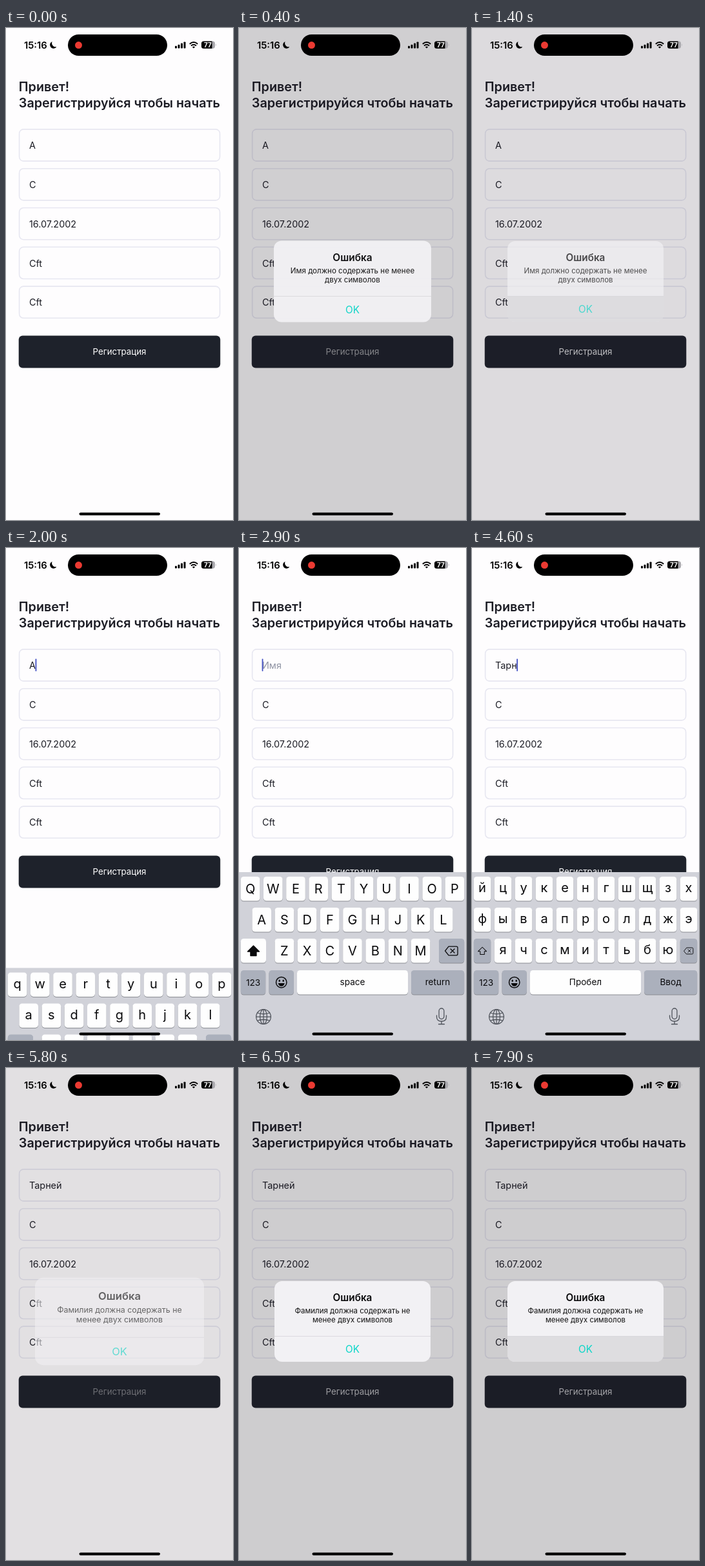
An HTML page that plays this animation: 352x762 px, repeating every 8000 ms.

```html
<!DOCTYPE html>
<html lang="ru">
<head>
<meta charset="utf-8">
<title>Регистрация</title>
<style>
html, body { margin: 0; width: 100%; height: 100%; overflow: hidden; background: #fefdfe; }
svg { display: block; width: 100%; height: 100%; }
text { font-family: Inter, Roboto, sans-serif; fill: #1c1d25; white-space: pre; }
.mid { text-anchor: middle; }
.head { font-size: 19.8px; font-weight: 600; }
.field { font-size: 14.4px; }
.note { font-size: 11.5px; fill: #111; }
.key { font-size: 20px; fill: #0a0a0c; }
.word { font-size: 13.6px; fill: #0a0a0c; }
</style>
</head>
<body>
<svg id="stage" viewBox="0 0 352 762"></svg>
<script>
const LOOP = 8000, STEP = 100;
const NAME = 'Тарней';
const PAPER = '#fefdfe', INK = '#0a0a0c', KEY = '#fefefe', GRAY = '#abb0bc';
const ROW_TOP = [509, 557, 605, 654], KEY_H = 37.5;
const stage = document.getElementById('stage');

function add(parent, tag, attrs = {}, content) {
  const el = document.createElementNS('http://www.w3.org/2000/svg', tag);
  for (const k in attrs) el.setAttribute(k, attrs[k]);
  if (content !== undefined) el.textContent = content;
  parent.appendChild(el);
  return el;
}
const box = (p, x, y, width, height, rx, fill, more) =>
  add(p, 'rect', { x, y, width, height, rx, fill, ...more });
const label = (p, cls, x, y, str, more) => add(p, 'text', { class: cls, x, y, ...more }, str);
const line = (p, d, stroke, width, more) =>
  add(p, 'path', { d, stroke, 'stroke-width': width, fill: 'none', 'stroke-linecap': 'round', 'stroke-linejoin': 'round', ...more });
const show = (el, on) => el.setAttribute('display', on ? 'inline' : 'none');
const put = (el, str) => { if (el.textContent !== str) el.textContent = str; };

// Form
const form = add(stage, 'g');
box(form, 0, 0, 352, 762, 0, PAPER);
label(form, 'head', 19.8, 98, 'Привет!');
label(form, 'head', 19.8, 123, 'Зарегистрируйся чтобы начать');
const fields = ['A', 'C', '16.07.2002', 'Cft', 'Cft'].map((value, i) => {
  const y = 156.9 + i * 60.8;
  box(form, 20.6, y, 311, 49.2, 6.5, PAPER, { stroke: '#e7e7f1', 'stroke-width': 1.6 });
  return label(form, 'field', 36, y + 30.2, value);
});
const caret = box(form, 36, 171.5, 1.8, 19.5, 0.9, '#4350c4');
box(form, 19.7, 476.5, 312.6, 50.1, 6, '#1e222b');
const submit = label(form, 'mid', 176, 506.4, 'Регистрация', { 'font-size': 13.3, style: 'fill:#fff' });

// Keyboard
const board = add(stage, 'g');
box(board, 0, 502, 352, 262, 0, '#d1d2d9');

function keyCap(p, x, y, w, fill) {
  box(p, x, y + 1, w, KEY_H, 4.6, '#8b8d93');
  return box(p, x, y, w, KEY_H, 4.6, fill);
}

function makeLayout(rows, centers, pitch, keyW, sideW, iconScale, words) {
  const g = add(board, 'g'), keys = {};
  rows.forEach((row, r) => [...row].forEach((ch, i) => {
    const x = centers[r] + i * pitch, y = ROW_TOP[r];
    keyCap(g, x - keyW / 2, y, keyW, KEY);
    keys[ch] = { x, y, w: keyW, text: label(g, 'key mid', x, y + 25, ch) };
  }));
  const shiftCap = keyCap(g, 2.8, ROW_TOP[2], sideW, GRAY);
  const eraseCap = keyCap(g, 349.2 - sideW, ROW_TOP[2], sideW, GRAY);
  const at = x => ({ transform: `translate(${x} 624) scale(${iconScale})` });
  const shift = line(g, 'M0-8 9 1H4.5V7.5H-4.5V1H-9Z', INK, 1.4, at(2.8 + sideW / 2));
  line(g, 'M-10 0-4.5-6.8H7.5Q9.5-6.8 9.5-4.8V4.8Q9.5 6.8 7.5 6.8H-4.5ZM-1.5-3 4.5 3M4.5-3-1.5 3', INK, 1.3,
    at(349.2 - sideW / 2));
  const space = label(g, 'word mid', 176, 676.5, words[0]);
  label(g, 'word mid', 308, 677.3, words[1]);
  const setCase = upper => {
    for (const ch in keys) {
      put(keys[ch].text, upper ? ch.toUpperCase() : ch);
      keys[ch].text.setAttribute('y', keys[ch].y + (upper ? 26 : 24.3));
    }
    shiftCap.setAttribute('fill', upper ? KEY : GRAY);
    shift.setAttribute('fill', upper ? INK : 'none');
  };
  return { g, keys, eraseCap, space, setCase };
}

keyCap(board, 2.8, ROW_TOP[3], 38.4, GRAY);
keyCap(board, 46.5, ROW_TOP[3], 38.4, GRAY);
keyCap(board, 90, ROW_TOP[3], 172, KEY);
keyCap(board, 267, ROW_TOP[3], 82.2, GRAY);
label(board, 'word mid', 22, 677.5, '123');
const face = add(board, 'g', { transform: 'translate(65.7 672.7)' });
add(face, 'circle', { r: 8.2, fill: 'none', stroke: INK, 'stroke-width': 1.5 });
for (const x of [-3, 3]) add(face, 'ellipse', { cx: x, cy: -2.5, rx: 1.2, ry: 1.7, fill: INK });
add(face, 'path', { d: 'M-5 1.3H5Q4 6 0 6T-5 1.3Z', fill: INK });

const en = makeLayout(['qwertyuiop', 'asdfghjkl', 'zxcvbnm'], [17.6, 35.2, 70.4], 35.2, 29.6, 39.2, 1,
  ['space', 'return']);
const ru = makeLayout(['йцукенгшщзх', 'фывапролджэ', 'ячсмитьбю'], [16, 16, 48], 32, 26.6, 26.4, 0.72,
  ['Пробел', 'Ввод']);

const globe = add(board, 'g', { transform: 'translate(38 726)', fill: 'none', stroke: '#50545c', 'stroke-width': 1.25 });
add(globe, 'circle', { r: 11.4 });
add(globe, 'ellipse', { rx: 5.4, ry: 11.4 });
add(globe, 'path', { d: 'M0-11.4V11.4M-11.4 0H11.4M-9.5-6Q0-2.5 9.5-6M-9.5 6Q0 2.5 9.5 6' });
const mic = add(board, 'g', { transform: 'translate(314 725)' });
box(mic, -3.9, -12, 7.8, 16.5, 3.9, 'none', { stroke: '#50545c', 'stroke-width': 1.3 });
line(mic, 'M-7.5-1V1.2Q-7.5 8 0 8T7.5 1.2V-1M0 8V12.5M-4.5 12.5H4.5', '#50545c', 1.3);

// Bubble above a pressed key
const bubble = add(board, 'g');
const bubbleShape = add(bubble, 'path', { fill: KEY, stroke: '#b6b8c0', 'stroke-width': 0.6 });
const bubbleText = label(bubble, 'mid', 0, 0, '', { 'font-size': 31 });
function popUp(key, ch) {
  show(bubble, !!key);
  if (!key) return;
  const h = key.w / 2, left = Math.max(1, key.x - h - 9), right = key.x + h + 9;
  const top = key.y - 52, a = key.x - h, b = key.x + h;
  bubbleShape.setAttribute('d', `M${left + 8} ${top}H${right - 8}Q${right} ${top} ${right} ${top + 8}V${key.y - 14}` +
    `C${right} ${key.y - 4} ${b} ${key.y - 5} ${b} ${key.y + 5}V${key.y + 33}Q${b} ${key.y + 38} ${b - 5} ${key.y + 38}` +
    `H${a + 5}Q${a} ${key.y + 38} ${a} ${key.y + 33}V${key.y + 5}C${a} ${key.y - 5} ${left} ${key.y - 4} ${left} ${key.y - 14}` +
    `V${top + 8}Q${left} ${top} ${left + 8} ${top}Z`);
  bubbleText.setAttribute('x', (left + right) / 2);
  bubbleText.setAttribute('y', key.y - 16);
  put(bubbleText, ch);
}

// Alert
const dim = box(stage, 0, 0, 352, 762, 0, '#110b18');
const alertBox = add(stage, 'g');
box(alertBox, 55, 330, 242, 125, 12, '#f2f1f4');
const okPress = add(alertBox, 'path', { d: 'M55 415.5H297V443Q297 455 285 455H67Q55 455 55 443Z', fill: '#dedde0' });
box(alertBox, 55, 415, 242, 0.7, 0, '#d3d2d7');
label(alertBox, 'mid', 176, 361.4, 'Ошибка', { 'font-size': 15.3, 'font-weight': 600, style: 'fill:#08080a' });
const notes = [379.9, 394.2].map(y => label(alertBox, 'note mid', 176, y, ''));
label(alertBox, 'mid', 176, 441.4, 'OK', { 'font-size': 15.2, style: 'fill:#08d6c8' });

// Status bar
const bar = add(stage, 'g');
label(bar, '', 28, 31.6, '15:16', { 'font-size': 14.8, 'font-weight': 600, style: 'fill:#000' });
add(bar, 'path', { d: 'M71.6 21A5.6 5.6 0 1 0 78.4 29.2A6 6 0 0 1 71.6 21Z' });
box(bar, 96, 10, 154, 33, 16.5, '#000');
add(bar, 'circle', { cx: 112.5, cy: 26.6, r: 5.5, fill: '#eb3a32' });
[3.6, 5.6, 7.8, 10].forEach((h, i) => box(bar, 262 + i * 4.5, 31.4 - h, 3, h, 0.9, '#000'));
line(bar, 'M284.8 24.8Q291 19.2 297.2 24.8M287 27.4Q291 24 295 27.4', '#000', 2, { 'stroke-linecap': 'butt' });
add(bar, 'path', { d: 'M288.8 29.2Q291 27.6 293.2 29.2L291 31.6Z' });
box(bar, 303, 20.4, 21, 11.4, 3.6, '#a9a8ad');
add(bar, 'path', { d: 'M306.6 20.4H319.5V31.8H306.6Q303 31.8 303 28.2V24Q303 20.4 306.6 20.4Z' });
add(bar, 'path', { d: 'M325 24.2Q326.6 26.1 325 28Z', fill: '#a9a8ad' });
label(bar, 'mid', 313, 29.8, '77', { 'font-size': 10, 'font-weight': 700, style: 'fill:#fff' });
box(bar, 113.5, 750.4, 125.5, 4.4, 2.2, '#000');

// Timeline
const alerts = [
  { start: 130, press: 1300, close: 1360, end: 1900, notes: ['Имя должно содержать не менее', 'двух символов'] },
  { start: 5725, press: 7900, close: LOOP, end: LOOP, notes: ['Фамилия должна содержать не', 'менее двух символов'] }
];
// [key down, letter typed, key up]
const strokes = [[3600, 3700, 3800], [4000, 4100, 4100], [4200, 4300, 4300],
  [4400, 4500, 4600], [4700, 4800, 4800], [4900, 5000, 5100]];
const within = (t, a, b) => t >= a && t < b;

function drawAlert(t) {
  const a = alerts.find(v => within(t, v.start, v.end));
  show(alertBox, a);
  show(dim, a);
  let textAlpha = within(t, 100, 130) || within(t, 5600, 5725) ? 0.3 : 1;
  if (a) {
    const age = t - a.start, rest = Math.exp(-age / 85);
    const fade = t < a.close ? 1 : Math.exp(-(t - a.close) / 110);
    const scale = 1 + 0.2 * rest, alpha = (1 - rest) * fade;
    alertBox.setAttribute('transform', `translate(176 392.5) scale(${scale}) translate(-176 -392.5)`);
    alertBox.setAttribute('opacity', alpha);
    dim.setAttribute('opacity', 0.2 * alpha);
    notes.forEach((n, i) => put(n, a.notes[i]));
    show(okPress, t >= a.press);
    textAlpha = 1 - fade * (0.25 + 0.45 * Math.exp(-age / 300));
  }
  submit.setAttribute('opacity', textAlpha);
}

function drawKeyboard(t) {
  const open = within(t, 2000, 5800);
  show(board, open);
  show(caret, open);
  if (!open) return;
  const w = (t - 1918.8) * 0.018;
  const drop = t < 2500 ? 260 * (1 + w) * Math.exp(-w) : 0;
  board.setAttribute('transform', `translate(0 ${drop})`);
  const russian = t >= 3100;
  show(en.g, !russian);
  show(ru.g, russian);
  en.setCase(t >= 2700);
  ru.setCase(t < 3700);
  en.eraseCap.setAttribute('fill', within(t, 2500, 2700) ? KEY : GRAY);
  globe.setAttribute('opacity', within(t, 3000, 3100) ? 0.5 : 1);
  put(ru.space, t < 3300 ? 'Русский' : 'Пробел');
  ru.space.setAttribute('opacity', within(t, 3200, 3400) ? 0.5 : 1);
  const i = strokes.findIndex(s => within(t, s[0], s[2]));
  popUp(i < 0 ? null : ru.keys[NAME[i].toLowerCase()], NAME[i]);
}

function drawName(t) {
  const typed = NAME.slice(0, strokes.filter(s => t >= s[1]).length);
  const value = t < 2600 ? 'A' : typed;
  put(fields[0], value || 'Имя');
  fields[0].style.fill = value ? '' : '#8f93a3';
  caret.setAttribute('x', 35.6 + (value ? fields[0].getComputedTextLength() : 0));
}

function draw(t) {
  drawName(t);
  drawKeyboard(t);
  drawAlert(t);
}

const begin = performance.now();
let last = -1;
function tick() {
  const t = Math.floor(((performance.now() - begin) % LOOP) / STEP) * STEP;
  if (t !== last) draw(last = t);
  requestAnimationFrame(tick);
}
tick();
</script>
</body>
</html>
```
